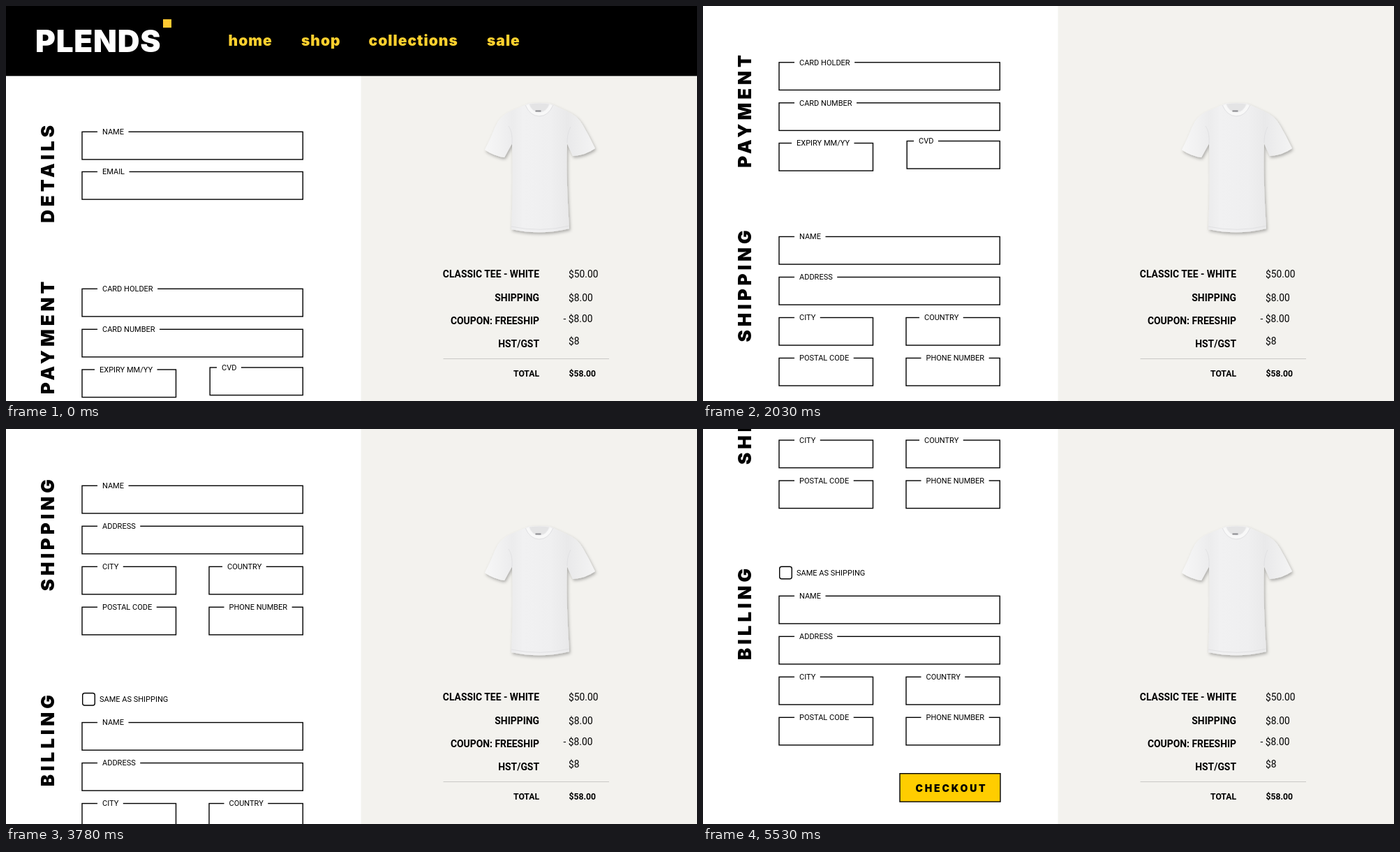
An HTML page that plays this animation: 990x566 px, repeating every 5600 ms.

```html
<!DOCTYPE html>
<html lang="en">
<head>
<meta charset="utf-8">
<title>Checkout</title>
<style>
  html, body { margin: 0; width: 100%; height: 100%; overflow: hidden; background: #fff; }
  svg { display: block; }
  text { font-family: Roboto, sans-serif; font-size: 11px; white-space: pre; }
  .heavy { font-family: Inter, sans-serif; font-weight: 900; }
  .logo { font-size: 44px; letter-spacing: .8px; fill: #fff; }
  .nav { font-size: 21px; letter-spacing: 1px; fill: #ffd02e; }
  .side { font-size: 26px; letter-spacing: 4.9px; text-anchor: middle; }
  .button { font-size: 14px; letter-spacing: 2.8px; text-anchor: middle; }
  .box { fill: none; stroke: #000; stroke-width: 1.4; }
  .item { font-size: 13.9px; font-weight: 600; text-anchor: end; }
  .price { font-size: 13.8px; }
  .total { font-size: 12.2px; font-weight: 700; }
  .end { text-anchor: end; }
</style>
</head>
<body>
<svg id="stage" width="990" height="566" viewBox="0 0 990 566">
  <defs>
    <linearGradient id="cloth">
      <stop offset="0" stop-color="#f7f7f7"/>
      <stop offset=".25" stop-color="#ececed"/>
      <stop offset=".35" stop-color="#f1f1f2"/>
      <stop offset=".6" stop-color="#efeff0"/>
      <stop offset=".75" stop-color="#e9e9ea"/>
      <stop offset="1" stop-color="#f4f4f4"/>
    </linearGradient>
    <filter id="shade" x="-10%" y="-10%" width="125%" height="125%">
      <feDropShadow dx="1.5" dy="2.5" stdDeviation="2" flood-opacity=".3"/>
    </filter>
  </defs>
  <g id="summary">
    <rect x="508.6" width="481.4" height="566" fill="#f3f2ee"/>
    <path filter="url(#shade)" fill="url(#cloth)" d="M748 140Q764 138 780 140L802 150Q819 157 826 170Q836 187 844 204Q830 214 812 215L804 197Q802 240 807 319Q766 329 724 320Q727 250 725 197L714 217Q699 215 686 206Q694 191 701 173Q707 158 722 151Z"/>
    <path fill="#e4e4e5" d="M750 140.5Q764 138.5 778 140.5Q775 151 764 152Q753 151 750 140.5Z"/>
    <path fill="none" stroke="#f8f8f8" stroke-width="4" d="M747 142Q753 155 764 155Q775 155 781 142"/>
    <path fill="none" stroke="#dedee0" stroke-width=".8" d="M744 142Q751 158 764 158Q777 158 784 142M724 316Q766 325 807 315M725 197Q726 180 720 172M804 196Q804 182 809 173"/>
    <rect x="758.5" y="149.5" width="8" height="2" fill="#8b8b8f"/>
    <path stroke="#c9c9c6" d="M626.5 505.5H864"/>
  </g>
  <g id="page">
    <rect width="990" height="100.3"/>
    <rect x="225" y="19" width="12" height="12" fill="#ffc931"/>
  </g>
</svg>
<script>
const $ = id => document.getElementById(id);
const page = $('page'), summary = $('summary');

function add(parent, tag, attrs, content = '') {
  const el = document.createElementNS('http://www.w3.org/2000/svg', tag);
  for (const key in attrs) el.setAttribute(key, attrs[key]);
  el.textContent = content;
  return parent.appendChild(el);
}
const label = (parent, cls, x, y, content) => add(parent, 'text', { class: cls, x, y }, content);

// Outlined input whose caption interrupts the top border
function field(x, y, right, name, textX = 138) {
  add(page, 'rect', { class: 'box', x, y, width: right - x, height: 39.6 });
  const gap = add(page, 'rect', { x: textX - 7, y: y - 5, height: 10, fill: '#fff' });
  const text = label(page, '', textX, y + 3.8, name);
  gap.setAttribute('width', text.getComputedTextLength() + 13.5);
}
const wide = (y, name) => field(109, y, 425.3, name);
const left = (y, name, textX) => field(109, y, 243.5, name, textX);
const right = (y, name, textX, x = 291) => field(x, y, 425.3, name, textX);

function address(y, countryX) {
  wide(y, 'NAME');
  wide(y + 58, 'ADDRESS');
  left(y + 116, 'CITY');
  right(y + 116, 'COUNTRY', countryX);
  left(y + 174, 'POSTAL CODE');
  right(y + 174, 'PHONE NUMBER', 319.5);
}

label(page, 'heavy logo', 42, 66, 'PLENDS');
[[318.5, 'home'], [423, 'shop'], [519.5, 'collections'], [689, 'sale']]
  .forEach(([x, name]) => label(page, 'heavy nav', x, 57, name));

[[239.5, 'DETAILS'], [474, 'PAYMENT'], [724.5, 'SHIPPING'], [1019, 'BILLING']]
  .forEach(([y, name]) => add(page, 'text',
    { class: 'heavy side', x: 1, transform: `translate(69 ${y}) rotate(-90)` }, name));

wide(180.3, 'NAME');
wide(237.5, 'EMAIL');
wide(405.3, 'CARD HOLDER');
wide(463.3, 'CARD NUMBER');
left(521, 'EXPIRY MM/YY', 134);
right(518, 'CVD', 309, 292.2);
address(655, 317);
add(page, 'rect', { class: 'box', x: 109.7, y: 952.2, width: 17.6, height: 17.6, rx: 3 });
label(page, '', 134, 965, 'SAME AS SHIPPING');
address(994.3, 319.5);
add(page, 'rect', { x: 282, y: 1248.7, width: 144, height: 40.4, fill: '#ffcd00', stroke: '#000', 'stroke-width': 1.4 });
label(page, 'heavy button', 356, 1274.6, 'CHECKOUT');

[
  ['CLASSIC TEE - WHITE', 389, 806, 389, '$50.00'],
  ['SHIPPING', 422.5, 806, 422.5, '$8.00'],
  ['COUPON: FREESHIP', 455.5, 798.5, 453, '- $8.00'],
  ['HST/GST', 488.5, 806, 485, '$8']
].forEach(([name, y, x, priceY, price]) => {
  label(summary, 'item', 764, y, name);
  label(summary, 'price', x, priceY, price);
});
label(summary, 'total end', 764, 531.3, 'TOTAL');
label(summary, 'total', 806.5, 531.3, '$58.00');

// Each scroll: start ms, end ms, distance, easing power
const scrolls = [
  [783, 1190, 224, 3],
  [1750, 2310, 201, 2],
  [2590, 3500, 140, 2.45],
  [3710, 4480, 190, 1.4]
];
const ease = (u, n) => u < .5 ? (2 * u) ** n / 2 : 1 - (2 - 2 * u) ** n / 2;
const scrollAt = t => scrolls.reduce((sum, [start, end, dist, n]) =>
  sum + dist * ease(Math.min(1, Math.max(0, (t - start) / (end - start))), n), 0);

const LOOP = 5600, STEP = 70;  // the picture advances in steps of 70 ms

function draw() {
  const t = performance.now() % LOOP;
  page.setAttribute('transform', `translate(0 ${-scrollAt(t - t % STEP)})`);
  requestAnimationFrame(draw);
}
draw();
</script>
</body>
</html>
```
